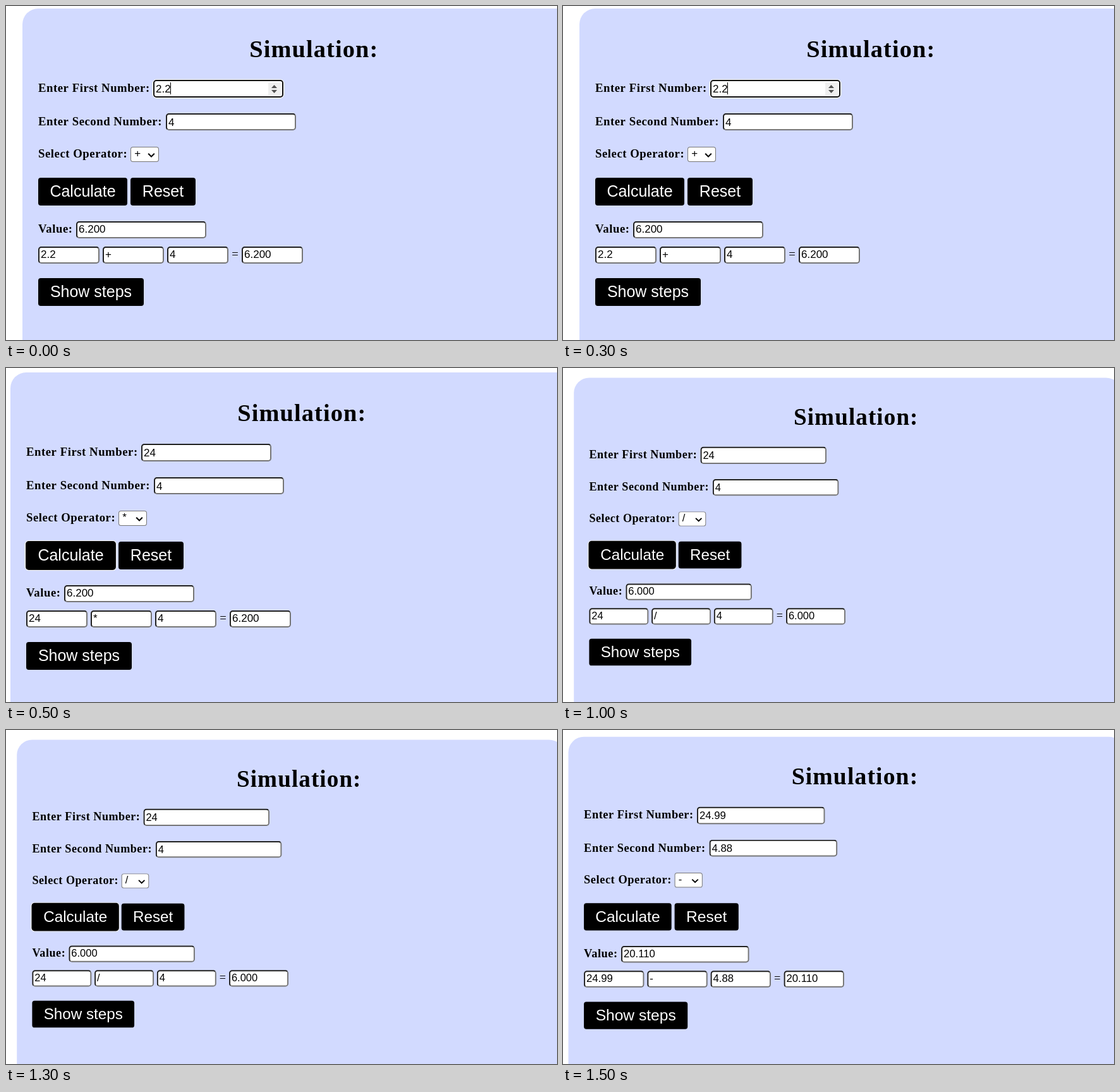
Write an HTML page with a canvas that moves like this. It is 872 px wide and 529 px high and loops after 2 s.

```html
<!DOCTYPE html>
<html lang="en">
<head>
<meta charset="utf-8">
<title>Simulation</title>
<style>
  html, body { margin: 0; width: 100%; height: 100%; overflow: hidden; background: #fff; }
  canvas { display: block; }
</style>
</head>
<body>
<canvas id="stage" width="872" height="529"></canvas>
<script>
const ctx = document.getElementById("stage").getContext("2d");
const SERIF = '"Liberation Serif", "Times New Roman", serif';
const SANS = '"Liberation Sans", Arial, sans-serif';
const STEP = 500;

// Each state: view offset and scale, calculator contents, focused control.
const states = [
  { x: 26, y: 4, scale: 1, a: "2.2", op: "+", b: "4", result: "6.200", focus: "first" },
  { x: 7, y: 7, scale: 1, a: "24", op: "*", b: "4", result: "6.200", focus: "calculate" },
  { x: 17.2, y: 15.4, scale: 0.968, a: "24", op: "/", b: "4", result: "6.000", focus: "calculate" },
  { x: 8.5, y: 10.7, scale: 0.983, a: "24.99", op: "-", b: "4.88", result: "20.110", focus: "" }
];

function box(x, y, w, h, radius, color) {
  ctx.fillStyle = color;
  ctx.beginPath();
  ctx.roundRect(x, y, w, h, radius);
  ctx.fill();
}

function write(text, x, y, font, color = "#000", spacing = 0, align = "left") {
  ctx.font = font;
  ctx.letterSpacing = spacing + "px";
  ctx.textAlign = align;
  ctx.fillStyle = color;
  ctx.fillText(text, x, y);
}

function polygon(points, color) {
  ctx.fillStyle = color;
  ctx.beginPath();
  points.forEach(([x, y]) => ctx.lineTo(x, y));
  ctx.fill();
}

const label = (text, y) => write(text, 25, y, `bold 18.72px ${SERIF}`, "#000", 0.55);

function field(text, x, y, w, h, baseline, focused = false) {
  if (focused) {
    box(x - 1, y - 1, w + 2, h + 2, 6, "#fff");
    box(x, y, w, h, 5, "#101010");
  } else {
    box(x, y, w, h, 5, "#767676");
    // Inset border: darker top and left sides, mitred at the corners.
    const m = h / 2;
    ctx.save();
    ctx.beginPath();
    ctx.roundRect(x, y, w, h, 5);
    ctx.clip();
    polygon([[x, y], [x + w, y], [x + w - m, y + m], [x + m, y + m], [x, y + h]], "#212121");
    ctx.restore();
  }
  box(x + 2, y + 2, w - 4, h - 4, 3, "#fff");
  write(text, x + 4, baseline, `17px ${SANS}`);
}

function spinnerAndCaret() {
  box(389, 117, 20, 20, 0, "#efefef");
  polygon([[394, 126], [398.5, 121], [403, 126]], "#505050");
  polygon([[394, 129], [398.5, 134], [403, 129]], "#505050");
  box(234, 117, 1, 19, 0, "#000");
}

function button(text, x, y, w, focused = false) {
  if (focused) {
    box(x - 2, y - 2, w + 4, 48, 6, "#fff");
    box(x - 1, y - 1, w + 2, 46, 5, "#101010");
  }
  box(x, y, w, 44, 4, "#000");
  write(text, x + w / 2, y + 30, `25px ${SANS}`, "#fff", 0, "center");
}

function operatorMenu(op) {
  box(171, 219, 45, 24, 4, "#767676");
  box(172, 220, 43, 22, 3, "#fff");
  write(op, 177.3, 235, `17px ${SANS}`);
  ctx.strokeStyle = "#000";
  ctx.lineWidth = 2;
  ctx.beginPath();
  ctx.moveTo(199.2, 229.8);
  ctx.lineTo(204, 234.5);
  ctx.lineTo(208.8, 229.8);
  ctx.stroke();
}

function draw({ x, y, scale, a, op, b, result, focus }) {
  ctx.setTransform(1, 0, 0, 1, 0, 0);
  box(0, 0, 872, 529, 0, "#fff");
  ctx.setTransform(scale, 0, 0, scale, x, y);
  box(0, 0, 895, 700, 25, "#d2daff");

  write("Simulation:", 359.3, 77, `bold 38.4px ${SERIF}`, "#000", 1.1);

  label("Enter First Number:", 132);
  field(a, 207, 113, 206, 28, 132.5, focus === "first");
  if (focus === "first") spinnerAndCaret();

  label("Enter Second Number:", 185);
  field(b, 227, 166, 206, 27, 185.5);

  label("Select Operator:", 236);
  operatorMenu(op);

  button("Calculate", 25, 268, 141, focus === "calculate");
  button("Reset", 171, 268, 103);

  label("Value:", 355);
  field(result, 85, 337, 206, 27, 355);

  [[a, 25], [op, 127], [b, 229], [result, 347]]
    .forEach(([text, left]) => field(text, left, 377, 97, 27, 395));
  write("=", 331.2, 395, `18.72px ${SERIF}`, "#000", 0.55);

  button("Show steps", 25, 427, 167);
}

function tick() {
  draw(states[Math.floor(performance.now() / STEP) % states.length]);
  requestAnimationFrame(tick);
}
tick();
</script>
</body>
</html>
```
